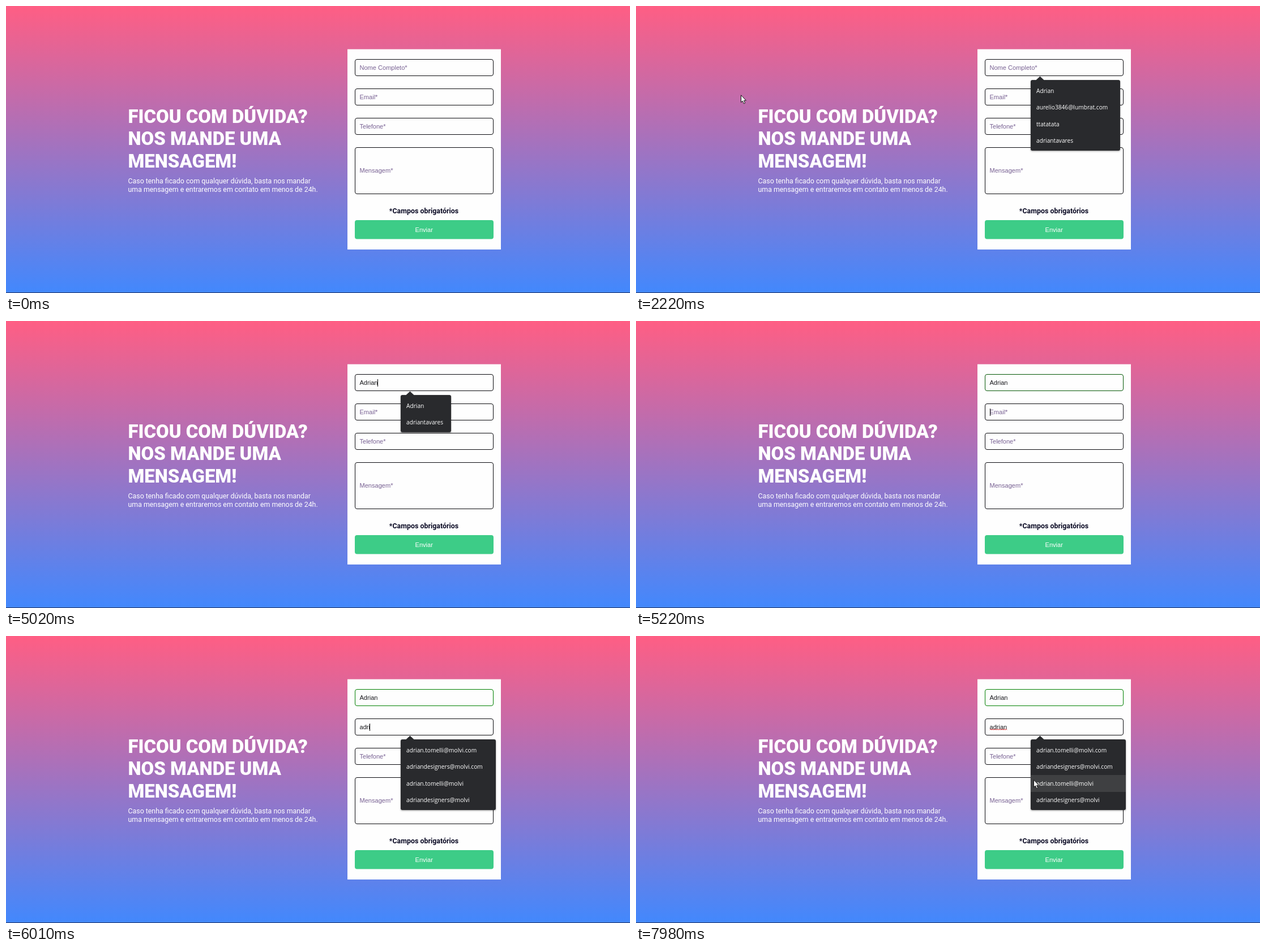
An HTML page with a canvas that plays this animation: 1102x508 px, repeating every 8000 ms.

```html
<!DOCTYPE html>
<html lang="pt-BR">
<head>
<meta charset="utf-8">
<title>Formulário de contato</title>
<style>
  html, body { margin: 0; width: 100%; height: 100%; overflow: hidden; }
  canvas { display: block; }
</style>
</head>
<body>
<canvas id="stage" width="1102" height="508"></canvas>
<script>
const ctx = document.getElementById('stage').getContext('2d');
const LOOP = 8000, STEP = 67;
const INPUT = '11.05px "Liberation Sans", Arial, sans-serif';
const MENU = '10.2px "Open Sans", "Noto Sans", sans-serif';
const roboto = (weight, size) => `${weight} ${size}px Roboto, sans-serif`;

const NAME = 'Adrian', LOGIN = 'adrian';
const NAME_KEYS = [3160, 3360, 3560, 3630, 3830, 3960];
const LOGIN_KEYS = [5550, 5680, 5950, 6010, 6220, 6290];
const NAME_CARET = [[1450, 1980], [2560, 3090], [3160, 4490], [5020, 5090]];
const LOGIN_CARET = [[5090, 6820], [7350, 7910]];

const mails = ['adrian.tomelli@molvi.com', 'adriandesigners@molvi.com',
  'adrian.tomelli@molvi', 'adriandesigners@molvi'];
const menus = [
  { from: 1540, to: 3230, y: 131, w: 158, items: ['Adrian', 'aurelio3846@lumbrat.com', 'ttatatata', 'adriantavares'] },
  { from: 3230, to: 3360, y: 131, w: 158, items: ['Adrian', 'aurelio3846@lumbrat.com', 'adriantavares'] },
  { from: 3360, to: 5090, y: 131, w: 89, items: ['Adrian', 'adriantavares'] },
  { from: 5550, to: 5680, y: 183, w: 168,
    items: [...mails.slice(0, 2), 'aurelio3846@lumbrat.com', ...mails.slice(2), 'ahahzyy@'] },
  { from: 5680, to: LOOP, y: 183, w: 168, items: mails }
];

// Pointer paths: keys are [step, x, y]
const moves = [
  { from: 190, to: 1800, keys: [[0, 1043, 496], [3, 900, 345], [6, 730, 165], [8, 641, 90], [9, 648, 99], [10.8, 664, 108]] },
  { from: 1800, to: 2560, keys: [[0, 648, 107], [1, 590, 106], [2, 500, 107], [3, 380, 88], [5, 217, 150], [6, 185, 157], [8, 100, 177], [10, 71, 170]] },
  { from: 6950, to: 7700, keys: [[0, 0, 368], [2, 16, 387], [4, 150, 433], [7, 447, 404]] },
  { from: 7700, to: LOOP, keys: [[0, 470, 393], [1, 531, 357], [2, 615, 305], [3, 680, 268], [4, 702, 254]] }
];

const within = (t, spans) => spans.some(([a, b]) => t >= a && t < b);
const typed = (word, keys, t) => word.slice(0, keys.filter(k => t >= k).length);

function rect(x, y, w, h, r, fill) {
  ctx.beginPath();
  ctx.roundRect(x, y, w, h, r);
  ctx.fillStyle = fill;
  ctx.fill();
}

// Baselines sit on whole pixels
function text(str, x, y, font, color, align = 'left') {
  ctx.font = font;
  ctx.fillStyle = color;
  ctx.textAlign = align;
  ctx.fillText(str, x, Math.round(y));
}

function shape(points, x, y) {
  ctx.beginPath();
  points.forEach(([px, py]) => ctx.lineTo(x + px, y + py));
  ctx.closePath();
}

function backdrop() {
  const g = ctx.createLinearGradient(0, 0, 0, 508);
  g.addColorStop(0, '#ff5e84');
  g.addColorStop(1, '#4288fd');
  ctx.fillStyle = g;
  ctx.fillRect(0, 0, 1102, 508);
  ctx.fillStyle = '#26345c';
  ctx.fillRect(0, 507, 1102, 1);
}

function copy() {
  ['FICOU COM DÚVIDA?', 'NOS MANDE UMA', 'MENSAGEM!'].forEach((line, i) =>
    text(line, 215.5, 206.8 + i * 39.5, roboto(900, 32.9), '#fff'));
  ['Caso tenha ficado com qualquer dúvida, basta nos mandar',
    'uma mensagem e entraremos em contato em menos de 24h.'].forEach((line, i) =>
    text(line, 215.5, 314 + i * 14.7, roboto(400, 12.37), '#fff'));
}

function field(y, h, label, value = '', caret = false, border = '#0b0b0f') {
  ctx.beginPath();
  ctx.roundRect(616.5, y, 244, h, 3.5);
  ctx.strokeStyle = border;
  ctx.lineWidth = 1;
  ctx.stroke();
  const mid = y + h / 2;
  text(value || label, 624.5, mid + 3.8, INPUT, value ? '#18181c' : '#776092');
  if (caret) {
    const end = value ? ctx.measureText(value).width : 0.8;
    ctx.fillStyle = '#000';
    ctx.fillRect(Math.floor(624.4 + end), Math.round(mid - 6.2), 1, 13);
  }
}

function form(t) {
  ctx.fillStyle = '#fefefe';
  ctx.fillRect(603, 76.5, 271, 354.5);
  const k = Math.min(1, Math.max(0, (t - 5090) / 200));
  const green = `rgb(${11 - 11 * k},${11 + 117 * k},${15 - 15 * k})`;
  field(94.5, 29, 'Nome Completo*', typed(NAME, NAME_KEYS, t), within(t, NAME_CARET), green);
  field(146.5, 29, 'Email*', typed(LOGIN, LOGIN_KEYS, t), within(t, LOGIN_CARET));
  field(198.5, 29, 'Telefone*');
  field(250.5, 82, 'Mensagem*');
  if (t >= 7910) squiggle(625, 655, 165.5);
  text('*Campos obrigatórios', 738, 367, roboto(700, 12.4), '#0a0a24', 'center');
  rect(616, 379, 245, 33.5, 4, '#3dcc87');
  text('Enviar', 738.2, 400, INPUT, '#fff', 'center');
}

function squiggle(x0, x1, y) {
  ctx.beginPath();
  for (let x = x0, i = 0; x <= x1; x += 1.5, i++) ctx.lineTo(x, y + (i % 2 ? -0.8 : 0.8));
  ctx.strokeStyle = '#e02a2a';
  ctx.lineWidth = 1;
  ctx.stroke();
}

function menu({ y, w, items }, hover) {
  const row = 29.6, pad = 3.5, dark = '#292a2d';
  ctx.save();
  ctx.shadowColor = 'rgba(0,0,0,.4)';
  ctx.shadowBlur = 3;
  ctx.shadowOffsetY = 1;
  rect(697, y, w, Math.round(items.length * row + pad * 2), 3, dark);
  ctx.restore();
  shape([[-7.5, 0.5], [0, -6.6], [7.5, 0.5]], 713.5, y);
  ctx.fillStyle = dark;
  ctx.fill();
  items.forEach((item, i) => {
    const top = y + pad + i * row;
    if (i === hover) {
      ctx.fillStyle = '#3f4042';
      ctx.fillRect(697, Math.round(top), w, 30);
    }
    text(item, 707, top + row / 2 + 4.2, MENU, '#fff');
  });
}

function place(keys, step) {
  let i = 1;
  while (i < keys.length - 1 && step > keys[i][0]) i++;
  const [a, ax, ay] = keys[i - 1], [b, bx, by] = keys[i];
  const k = Math.min(1, (step - a) / (b - a));
  return [Math.round(ax + (bx - ax) * k), Math.round(ay + (by - ay) * k)];
}

function outline() {
  ctx.fillStyle = '#fff';
  ctx.strokeStyle = '#111';
  ctx.lineWidth = 1;
  ctx.lineJoin = 'round';
  ctx.fill();
  ctx.stroke();
}

function arrow(x, y) {
  shape([[0.5, 0.8], [0.5, 13.6], [3.3, 11], [5.4, 15.8], [7.6, 14.9], [5.6, 10.2], [9.4, 10.2]], x, y);
  outline();
}

function hand(x, y) {
  const path = new Path2D('M3.5 11V1.8q1.4-1.8 2.8 0V7q1.4-1.2 2.5.2q1.5-.9 2.4.5q1.8-.6 2.3 1V13q0 2.2-1.6 3.6V18H5.2V16.6L.8 11.4q.2-2.2 2.7-.4z');
  ctx.save();
  ctx.translate(x, y);
  ctx.fillStyle = '#fff';
  ctx.strokeStyle = '#111';
  ctx.lineWidth = 1;
  ctx.lineJoin = 'round';
  ctx.fill(path);
  ctx.stroke(path);
  ctx.stroke(new Path2D('M6.3 7v3M8.8 7.5V10M11.2 8V10.2'));
  ctx.restore();
}

function pointer(t) {
  const move = moves.find(m => t >= m.from && t < m.to);
  if (!move) return;
  const [x, y] = place(move.keys, Math.floor((t - move.from) / STEP));
  const overField = x > 612 && x < 858 && y > 95 && y < 123;
  if (overField) hand(x, y);
  else arrow(x, y);
}

function halo() {
  ctx.beginPath();
  ctx.arc(668.8, 108.4, 11, 0, Math.PI * 2);
  ctx.fillStyle = 'rgba(255,242,84,.72)';
  ctx.fill();
}

function draw(now) {
  const t = now % LOOP;
  backdrop();
  copy();
  form(t);
  const open = menus.find(m => t >= m.from && t < m.to);
  if (open) menu(open, t >= 7960 ? 2 : -1);
  if (t >= 1450 && t < 1540) halo();
  pointer(t);
}

const start = performance.now();
function tick() {
  draw(performance.now() - start);
  requestAnimationFrame(tick);
}
tick();
</script>
</body>
</html>
```
